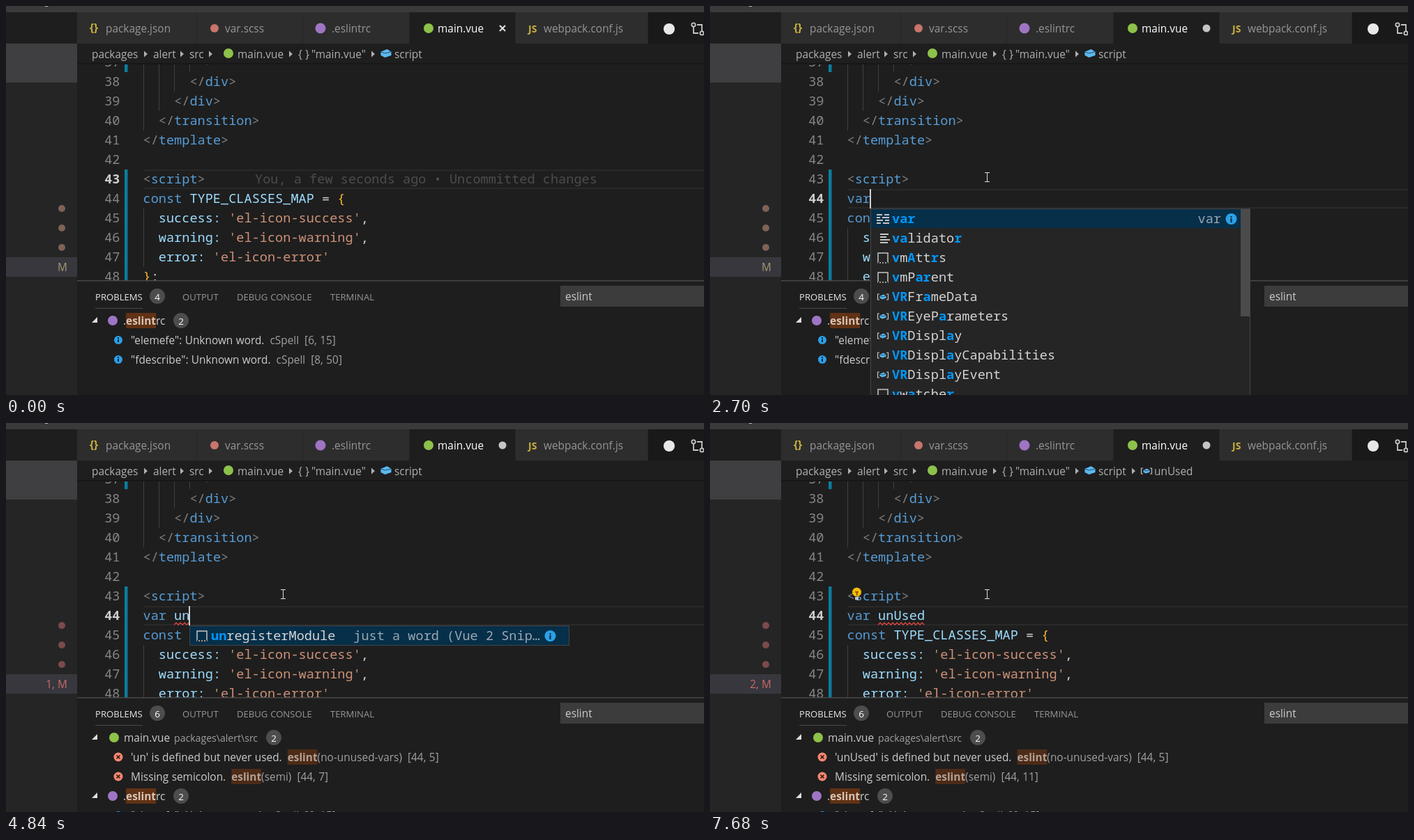
Animation, 1001 px wide and 559 px high, one loop 8 s. Source, as an HTML page with a canvas:

```html
<!DOCTYPE html>
<html lang="en">
<head>
<meta charset="utf-8">
<title>Editor linting</title>
<style>
html, body { margin: 0; height: 100%; overflow: hidden; background: #1e1e1e; }
canvas { display: block; }
</style>
</head>
<body>
<canvas id="stage" width="1001" height="559"></canvas>
<script>
const ctx = document.getElementById('stage').getContext('2d');
const LOOP = 8000, CHAR = 11.15, LEFT = 196.5, ROW = 28;
const MONO = '"Noto Sans Mono", "DejaVu Sans Mono", monospace';
const SANS = '"Open Sans", "Noto Sans", sans-serif';
const C = {
  bg: '#1e1e1e', side: '#252526', tag: '#569cd6', punct: '#808080', id: '#9cdcfe',
  str: '#ce9178', text: '#d4d4d4', gold: '#fcb932', dim: '#a0a0a0', label: '#cccccc',
  teal: '#0c7d9d', vue: '#8dc149', purple: '#a074c4', blue: '#0097fb', error: '#f48771'
};

// Timelines: each value holds from its time until the next one.
const TYPED = [[0, ''], [2370, 'v'], [2530, 'va'], [2620, 'var'], [3480, 'var '], [4470, 'var u'],
  [4620, 'var un'], [5010, 'var unU'], [5320, 'var unUs'], [5640, 'var unUse'], [5870, 'var unUsed'],
  [6340, 'var unUsed '], [6590, 'var unUsed']];
const CARET = [[0, false], [600, true], [1130, false], [1680, true], [3160, false], [3480, true],
  [4070, false], [4470, true], [7110, false]];
const LINTED = [[0, ''], [4840, 'un'], [5240, 'unU'], [5560, 'unUs'], [5870, 'unUse'], [6020, 'unUsed']];
const SYMBOL = [[0, ''], [5010, 'un'], [6190, 'unUsed'], [6800, ''], [7590, 'unUsed']];
const SIDE_COUNT = [[0, 0], [3160, 1], [5010, 2], [6695, 3], [7500, 2]];

// Suggestions: icon kind, then a label with the matched letters between asterisks.
const VAR_ITEMS = ['keyword *var*', 'text *va*lidato*r*', 'word *v*m*A*tt*r*s', 'word *v*mP*ar*ent',
  'variable *VR*Fr*a*meData', 'variable *VR*EyeP*a*rameters', 'variable *VR*Displ*a*y',
  'variable *VR*Displ*a*yCapabilities', 'variable *VR*Displ*a*yEvent', 'word *v*w*a*tche*r*'];
const UN_ITEMS = ['word *un*registerMod*u*le'];
const U_ITEMS = [...UN_ITEMS, 'word *u*pdate', 'word *u*pdated', 'text *u*se', 'text *u*ser',
  'variable *U*RL', 'variable *U*RLSearchParams', 'text *u*pload'];
const WORD_HINT = 'just a word (Vue 2 Snip…';
const POPUP = [[0, null], [2450, [VAR_ITEMS, 1, 1, 'var']], [2530, [VAR_ITEMS, 2, 2, 'var']],
  [2700, [VAR_ITEMS, 3, 3, 'var']], [3610, null], [4540, [U_ITEMS, 5, 1, WORD_HINT]],
  ...[4620, 5010, 5320, 5640].map((time, i) => [time, [UN_ITEMS, 6 + i, 2 + i, WORD_HINT]]),
  [5870, null]];

const at = (track, t) => track.filter(([time]) => time <= t).pop()[1];

function rect(x, y, w, h, color) {
  ctx.fillStyle = color;
  ctx.fillRect(x, y, w, h);
}
function dot(x, y, r, color) {
  ctx.fillStyle = color;
  ctx.beginPath();
  ctx.arc(x, y, r, 0, 7);
  ctx.fill();
}
function path(points, color, width, fill) {
  ctx.beginPath();
  points.forEach(([x, y]) => ctx.lineTo(x, y));
  if (fill) { ctx.fillStyle = color; ctx.fill(); return; }
  ctx.strokeStyle = color;
  ctx.lineWidth = width;
  ctx.stroke();
}
function write(str, x, y, color, font, align = 'left', spacing = '0px') {
  ctx.font = font;
  ctx.fillStyle = color;
  ctx.textAlign = align;
  ctx.wordSpacing = spacing;
  ctx.fillText(str, x, y);
  return x + ctx.measureText(str).width;
}
const label = (str, x, y, color = C.label, { size = 15.4, bold = '', align } = {}) =>
  write(str, x, y + 5.5, color, `${bold} ${size}px ${SANS}`, align, '0.4px');
const mono = (str, x, y, color, bold = '', align) =>
  write(str, x, y + 6, color, `${bold} 18.6px ${MONO}`, align);

const rowY = line => 249 + (line - 43) * ROW;

function code(line, indent, ...tokens) {
  let column = indent;
  tokens.forEach(([str, color]) => {
    mono(str, LEFT + column * CHAR, rowY(line), color);
    column += str.length;
  });
}
const tag = (open, name) => [[open, C.punct], [name, C.tag], ['>', C.punct]];
const entry = (key, value, end) => [[key + ': ', C.id], [`'${value}'`, C.str], [end, C.text]];

function squiggle(column, length, line) {
  const x0 = LEFT + column * CHAR, points = [];
  for (let x = 0; x <= length * CHAR; x += 3) points.push([x0 + x, rowY(line) + (x % 6 ? 10 : 13)]);
  path(points, '#e0483e', 1.3);
}
function badge(n, x, y) {
  dot(x, y, 11, '#4d4d4d');
  label(n, x, y, '#fff', { size: 13.5, align: 'center' });
}
function infoIcon(x, y, r) {
  dot(x, y, r, '#2aa0e8');
  rect(x - 1, y - 1, 2, r - 2, '#123');
  rect(x - 1, y - 4, 2, 2, '#123');
}
function cube(x, y, s) {
  path([[x - s, y - s * .3], [x + s * .2, y - s * .8], [x + s, y - s * .3], [x + s, y + s * .4],
    [x - s * .2, y + s * .8], [x - s, y + s * .4]], '#5db8ee', 0, true);
  path([[x - s, y - s * .3], [x - s * .2, y], [x + s, y - s * .3]], '#1d4f70', 1);
}
function variableIcon(x, y) {
  cube(x, y, 4.5);
  for (const d of [-1, 1])
    path([[x + d * 5, y - 4], [x + d * 7.5, y - 4], [x + d * 7.5, y + 4], [x + d * 5, y + 4]], '#c5c5c5', 1.2);
}

function drawSidebar(count) {
  rect(0, 9, 102, 45, C.bg);
  rect(0, 54, 102, 505, C.side);
  rect(0, 54, 102, 56, '#3f3f41');
  rect(0, 361, 102, 28, '#37373d');
  for (const y of [291, 319, 347]) dot(80, y, 5, count ? '#7c4a4c' : '#7d6355');
  label(count ? count + ', M' : 'M', 88, 375, count ? '#c96a66' : '#a59a78', { align: 'right' });
}

function drawTabs(dirty) {
  rect(0, 0, 1001, 9, '#3a3a3b');
  rect(56, 0, 4, 1, '#bbb');
  rect(102, 9, 899, 45, C.side);
  for (const [x, w] of [[102, 171], [274, 151], [426, 152], [731, 189]]) rect(x, 9, w, 45, '#2d2d2d');
  rect(579, 9, 151, 45, C.bg);
  rect(921, 9, 80, 45, '#191919');
  label('{}', 120, 31, '#cbb13f', { bold: 'bold' });
  label('package.json', 143, 32, '#969696');
  dot(299, 32, 6, '#c9756b');
  label('var.scss', 314, 32, '#969696');
  dot(451, 32, 7.5, C.purple);
  label('.eslintrc', 467, 32, '#969696');
  dot(606, 32, 7, C.vue);
  label('main.vue', 619, 32, '#fff');
  label('JS', 749, 32, '#cbb13f', { size: 14, bold: 'bold' });
  label('webpack.conf.js', 771, 32, '#969696');
  if (dirty) dot(712, 32, 5.5, '#c5c5c5');
  else for (const d of [-4, 4]) path([[712 - d, 28], [712 + d, 36]], '#e0e0e0', 2.2);
  dot(951, 33, 8, '#e8e8e8');
  path([[986, 30], [986, 39], [993, 39]], '#c5c5c5', 1.8);
  path([[991, 27], [998, 27], [998, 36]], '#c5c5c5', 1.8);
  for (const [x, y] of [[986, 27], [998, 39]]) {
    ctx.beginPath();
    ctx.arc(x, y, 2.7, 0, 7);
    ctx.stroke();
  }
}

function drawBreadcrumb(symbol) {
  const arrow = x => path([[x - 2, 64.5], [x + 3, 69], [x - 2, 73.5]], '#b0b0b0', 0, true);
  rect(102, 54, 899, 29, C.bg);
  rect(102, 82, 899, 2, '#171717');
  for (const [str, x] of [['packages', 123], ['alert', 211], ['src', 263], ['main.vue', 332],
    ['{ }', 419], ['"main.vue"', 438], ['script', 557]]) label(str, x, 69, '#b0b0b0');
  [200, 252, 293, 408, 526].forEach(arrow);
  dot(319, 68, 7, C.vue);
  cube(545, 68, 7.5);
  if (symbol) {
    arrow(607);
    variableIcon(626, 69);
    label(symbol, 637, 69, '#b0b0b0');
  }
}

function drawEditor(t, typed) {
  const added = t >= 1910 ? 1 : 0, active = 43 + added;
  ctx.save();
  ctx.beginPath();
  ctx.rect(102, 83, 899, 311);
  ctx.clip();
  rect(102, 83, 899, 311, C.bg);
  for (const dy of [-14, 12]) rect(197, rowY(active) + dy, 804, 2, '#292929');
  rect(170, 83, 4.5, 12, C.teal);
  rect(170, 235, 4.5, 160, C.teal);
  [179, 151, 123, 95].forEach((bottom, i) =>
    rect(Math.round(LEFT + i * 2 * CHAR), 83, 1, bottom - 83, '#404040'));
  rect(197, rowY(45 + added) - 14, 1, 84, '#404040');
  for (let n = 37; n <= 48; n++)
    mono(n, 163.5, rowY(n), n === active ? '#d0d0d0' : '#858585', n === active ? 'bold' : '', 'right');

  code(37, 8, ['>', C.punct]);
  code(38, 6, ...tag('</', 'div'));
  code(39, 4, ...tag('</', 'div'));
  code(40, 2, ...tag('</', 'transition'));
  code(41, 0, ...tag('</', 'template'));
  code(43, 0, ...tag('<', 'script'));
  if (!added) mono('You, a few seconds ago • Uncommitted changes', 357, rowY(43), '#4c4c4c');
  else code(44, 0, [typed.slice(0, 3), typed.startsWith('var') ? C.tag : C.id], [typed.slice(3), C.id]);
  code(44 + added, 0, ['const ', C.tag], ['TYPE_CLASSES_MAP', C.id], [' = ', C.text], ['{', C.gold]);
  code(45 + added, 2, ...entry('success', 'el-icon-success', ','));
  code(46 + added, 2, ...entry('warning', 'el-icon-warning', ','));
  code(47 + added, 2, ...entry('error', 'el-icon-error', ''));
  code(48 + added, 0, ['}', C.gold], [';', C.text]);

  if (t >= 2930 && t < 4840) squiggle(0, 5, 45);
  squiggle(4, at(LINTED, t).length, 44);
  if (at(CARET, t)) {
    const column = added ? typed.length : 8;
    rect(Math.round(LEFT - 1 + column * CHAR), rowY(active) - 14, 2, 28, '#d0d0d0');
  }
  if (t >= 7680) {
    dot(210.5, 243, 6.5, '#fcbc05');
    rect(208, 242, 5, 1.5, '#6b5000');
    rect(210, 243, 1.5, 5, '#6b5000');
    rect(208, 250, 5, 4, '#c5c5c5');
  }
  ctx.restore();
}

function problems(t) {
  const name = at(LINTED, t);
  if (t < 2930) return [];
  if (!name) return [["Parsing error: Unexpected keyword 'const'", '', '[45, 1]']];
  const end = `[44, ${5 + name.length}]`;
  const list = [[`'${name}' is defined but never used.`, '(no-unused-vars)', '[44, 5]'],
    ['Missing semicolon.', '(semi)', end]];
  if (t >= 6590 && t < 7360) list.push(['Trailing spaces not allowed.', '(no-trailing-spaces)', end]);
  return list;
}

function matched(x, y, back = '#613214', color = '#d8c4b6') {
  rect(x, y - 11, 43, 22, back);
  return label('eslint', x, y, color, { bold: 'bold' });
}

function drawPanel(t) {
  const list = problems(t);
  rect(102, 394, 899, 165, C.bg);
  rect(102, 394, 899, 1.5, '#474747');
  for (const [str, x] of [['PROBLEMS', 128], ['OUTPUT', 253], ['DEBUG CONSOLE', 331], ['TERMINAL', 465]])
    label(str, x, 417, x === 128 ? '#e7e7e7' : '#969696', { size: 13.1 });
  rect(128, 434, 68, 1, '#484848');
  badge(4 + list.length, 217, 417);
  rect(795, 402, 206, 30, '#3c3c3c');
  label('eslint', 802, 417);

  let y = 452;
  const header = color => {
    path([[131, y - 5], [131, y + 3], [123, y + 3]], '#e0e0e0', 0, true);
    dot(color === C.vue ? 155 : 153, y, 7, color);
  };
  if (list.length) {
    header(C.vue);
    label('main.vue', 169, y);
    label('packages\\alert\\src', 241, y, C.dim, { size: 14.1 });
    badge(list.length, 384, y);
    y += ROW;
  }
  for (const [message, rule, place] of list) {
    dot(161, y, 6.5, C.error);
    for (const d of [-2.5, 2.5]) path([[161 - d, y - 2.5], [161 + d, y + 2.5]], '#3a1410', 1.6);
    let x = matched(label(message, 179, y) + 8, y, '#4d2b17', '#b3a094');
    x = label(rule, x, y, C.dim);
    label(place, x + 8, y, C.dim);
    y += ROW;
  }
  header(C.purple);
  label('rc', matched(label('.', 168, y), y), y);
  badge(2, 251, y);
  for (const [word, place] of [['elemefe', '[6, 15]'], ['fdescribe', '[8, 50]']]) {
    y += ROW;
    infoIcon(161, y, 6);
    const x = label('cSpell', label(`"${word}": Unknown word.`, 179, y) + 8, y, C.dim);
    label(place, x + 8, y, C.dim);
  }
}

function itemIcon(kind, x, y) {
  const bar = (dx, dy, w) => rect(x + dx, y + dy, w, 2, '#c5c5c5');
  if (kind === 'variable') variableIcon(x, y);
  if (kind === 'text') [12, 9, 14, 11].forEach((w, i) => bar(-4, i * 4 - 7, w));
  if (kind === 'keyword') [9, 6, 10, 7].forEach((w, i) => {
    bar(-9, i * 4 - 7, w - 1);
    bar(w - 7, i * 4 - 7, 16 - w);
  });
  if (kind === 'word') {
    ctx.strokeStyle = '#c5c5c5';
    ctx.lineWidth = 1.5;
    ctx.strokeRect(x - 7, y - 7, 14, 14);
    ctx.setLineDash([2, 2]);
    path([[x - 7, y + 7], [x + 7, y + 7]], C.side, 2);
    ctx.setLineDash([]);
  }
}

function drawPopup([items, column, matches, hint]) {
  const x = Math.round(LEFT + column * CHAR), long = items.length > 9;
  const height = long ? 300 : items.length * ROW;
  rect(x, 291, 545, height + 1, '#454545');
  rect(x + 1, 292, 543, height - 1, C.side);
  rect(x + 1, 292, 543, ROW - 1, '#062f4a');
  items.forEach((item, i) => {
    const y = 306 + i * ROW, [kind, text] = item.split(' ');
    let left = matches, cx = x + 31;
    itemIcon(kind, x + 18, y);
    text.split('*').forEach((part, j) => {
      for (const letter of part) {
        const hit = j % 2 && left-- > 0;
        mono(letter, cx, y, hit ? C.blue : C.text, hit ? 'bold' : '');
        cx += CHAR;
      }
    });
  });
  mono(hint, x + 503, 306, '#9aa7b0', '', 'right');
  infoIcon(x + 517.5, 306, 8);
  if (long) rect(x + 531, 292, 13, 154, '#4b4b4c');
}

function drawPointer(t) {
  if (t < 70) return;
  const u = Math.min(1, Math.floor((t - 70) / 75.5) / 9), v = 1 - u;
  const curve = (a, b, c, d) => Math.round(a * v ** 3 + 3 * b * v * v * u + 3 * c * v * u * u + d * u ** 3);
  const x = curve(58, 350, 640, 398), y = curve(2, 200, 500, 246);
  if (x < 102 || y < 83) {
    path([[x, y], [x, y + 17], [x + 4, y + 13], [x + 7, y + 19], [x + 9, y + 18], [x + 7, y + 12], [x + 12, y + 12]],
      '#fff', 0, true);
    return;
  }
  rect(x - 1, y - 6, 1, 12, '#dcdcdc');
  for (const dy of [-7, 6]) rect(x - 4, y + dy, 7, 1, '#dcdcdc');
}

function frame(now) {
  const t = now % LOOP, popup = at(POPUP, t);
  drawSidebar(at(SIDE_COUNT, t));
  drawTabs(t >= 1910);
  drawEditor(t, at(TYPED, t));
  drawBreadcrumb(at(SYMBOL, t));
  drawPanel(t);
  if (popup) drawPopup(popup);
  drawPointer(t);
  requestAnimationFrame(frame);
}
requestAnimationFrame(frame);
</script>
</body>
</html>
```
